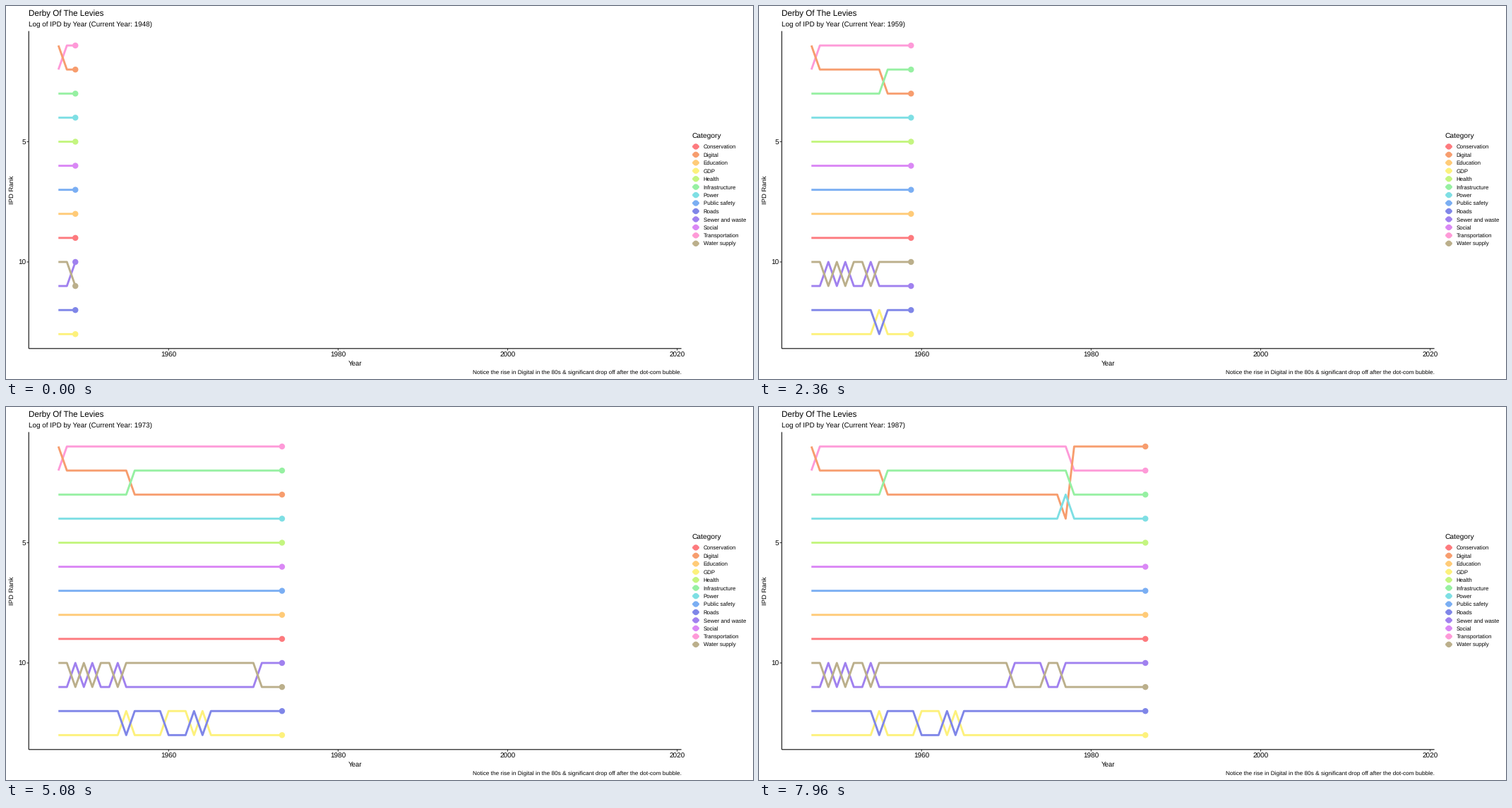
Recreate the animation shown at these times as a matplotlib script. Size 1058 px wide and 529 px high, loop 8 s.

```python
import numpy as np
import matplotlib.pyplot as plt
from matplotlib.animation import FuncAnimation
from matplotlib.patches import Circle

W, H, DPI = 1058, 529, 100
FRAMES, INTERVAL = 200, 40
PT = 72 / DPI  # points per pixel
plt.rcParams["font.family"] = "Liberation Sans"
plt.rcParams["text.hinting"] = "none"

FIRST_YEAR, LAST_YEAR = 1947, 2017
YEARS = np.arange(FIRST_YEAR, LAST_YEAR + 1)
YEAR_STEP = (LAST_YEAR - FIRST_YEAR) / 359

# name: (colour, starting rank, {year: rank from that year on})
WATER = {1949: 11, 1950: 10, 1951: 11, 1952: 10, 1954: 11, 1955: 10,
         1971: 11, 1975: 10, 1977: 11}
GDP = {1955: 12, 1956: 13, 1960: 12, 1963: 13, 1964: 12, 1965: 13}
SERIES = {
    "Conservation": ("#fd7a7e", 9, {}),
    "Digital": ("#f79d6e", 1, {1948: 2, 1956: 3, 1977: 4, 1978: 1}),
    "Education": ("#ffcb78", 8, {}),
    "GDP": ("#fdf17c", 13, GDP),
    "Health": ("#c4f580", 5, {}),
    "Infrastructure": ("#96f0a2", 3, {1956: 2, 1978: 3}),
    "Power": ("#7edfe4", 4, {1977: 3, 1978: 4}),
    "Public safety": ("#7aaef3", 7, {}),
    "Roads": ("#7f86e8", 12, {y: 25 - r for y, r in GDP.items()}),
    "Sewer and waste": ("#a081ef", 11, {y: 21 - r for y, r in WATER.items()}),
    "Social": ("#da88f5", 6, {}),
    "Transportation": ("#fe9ad8", 2, {1948: 1, 1978: 2}),
    "Water supply": ("#bbaf8b", 10, WATER),
}
BACKMOST = "Transportation"


def x_of(year):
    return 230.3 + 12.005 * (year - 1960)


def y_of(rank):
    return 21.9 + 34.11 * rank


# The panel reaches 5 % beyond the data on every side
LEFT, RIGHT = x_of(FIRST_YEAR - 3.5), x_of(LAST_YEAR + 3.5)
TOP, BOTTOM = y_of(0.4), y_of(13.6)


def rank_path(start, changes):
    ranks = np.full(len(YEARS), float(start))
    for year, rank in sorted(changes.items()):
        ranks[YEARS >= year] = rank
    return ranks


def head_year(frame):
    """Half-speed glide that skips two years ahead after every two years."""
    u = frame * YEAR_STEP / 2
    return 1949 + u + 2 * np.floor(u / 2)


fig = plt.figure(figsize=(W / DPI, H / DPI), dpi=DPI, facecolor="white")
ax = fig.add_axes([0, 0, 1, 1])
ax.set_xlim(0, W)
ax.set_ylim(H, 0)
ax.axis("off")


def label(x, y, text, px, color="black", **kw):
    return ax.text(x, y, text, fontsize=px * PT, color=color,
                   **{"va": "baseline", **kw})


def rule(xs, ys, color="black", px=1.07, **kw):
    line, = ax.plot(xs, ys, color=color, lw=px * PT, snap=False,
                    solid_capstyle="butt", solid_joinstyle="round", **kw)
    return line


def dot(x, y, color):
    return ax.add_patch(Circle((x, y), 4.2, color=color, lw=0, zorder=4))


# Titles and axes
label(32, 14.4, "Derby Of The Levies", 11.65)
subtitle = label(32, 28.8, "", 9.89)
label(956.5, 522.5, "Notice the rise in Digital in the 80s & significant "
      "drop off after the dot-com bubble.", 8.23, ha="right")
label(494.3, 510, "Year", 9.7, ha="center")
label(9, 261, "IPD Rank", 9.5, ha="center", va="center", rotation=90)
rule([LEFT, LEFT], [TOP, BOTTOM])
rule([LEFT, RIGHT], [BOTTOM, BOTTOM])
for year in range(1960, 2021, 20):
    x = x_of(year)
    rule([x, x], [BOTTOM, BOTTOM + 2.75], "#333333")
    label(x, 498, str(year), 10, ha="center")
for rank in (5, 10):
    y = y_of(rank)
    rule([LEFT - 2.75, LEFT], [y, y], "#333333")
    label(28, y + 3.8, str(rank), 10, ha="right")

# Legend
label(971, 188, "Category", 10.3)
for i, (name, (color, *_)) in enumerate(SERIES.items()):
    y = 199.4 + 11.45 * i
    rule([972.2, 981.8], [y, y], color, 3)
    dot(977, y, color)
    label(987.7, y + 3, name, 7.9)

# Moving series, back to front
tracks = []
for name in sorted(SERIES, key=lambda n: n != BACKMOST):
    color, start, changes = SERIES[name]
    line = rule([], [], color, 2.9, zorder=3)
    tracks.append((rank_path(start, changes), line, dot(0, 0, color)))


def update(frame):
    head = head_year(frame)
    now = FIRST_YEAR + (frame + 4) * YEAR_STEP
    subtitle.set_text(f"Log of IPD by Year (Current Year: {round(now)})")
    seen = YEARS < head
    xs = x_of(np.append(YEARS[seen], head))
    for ranks, line, mark in tracks:
        ys = y_of(np.append(ranks[seen], np.interp(head, YEARS, ranks)))
        line.set_data(xs, ys)
        mark.center = xs[-1], ys[-1]
    return []


anim = FuncAnimation(fig, update, frames=FRAMES, interval=INTERVAL,
                     repeat=True, repeat_delay=0, blit=False)
plt.show()
```
